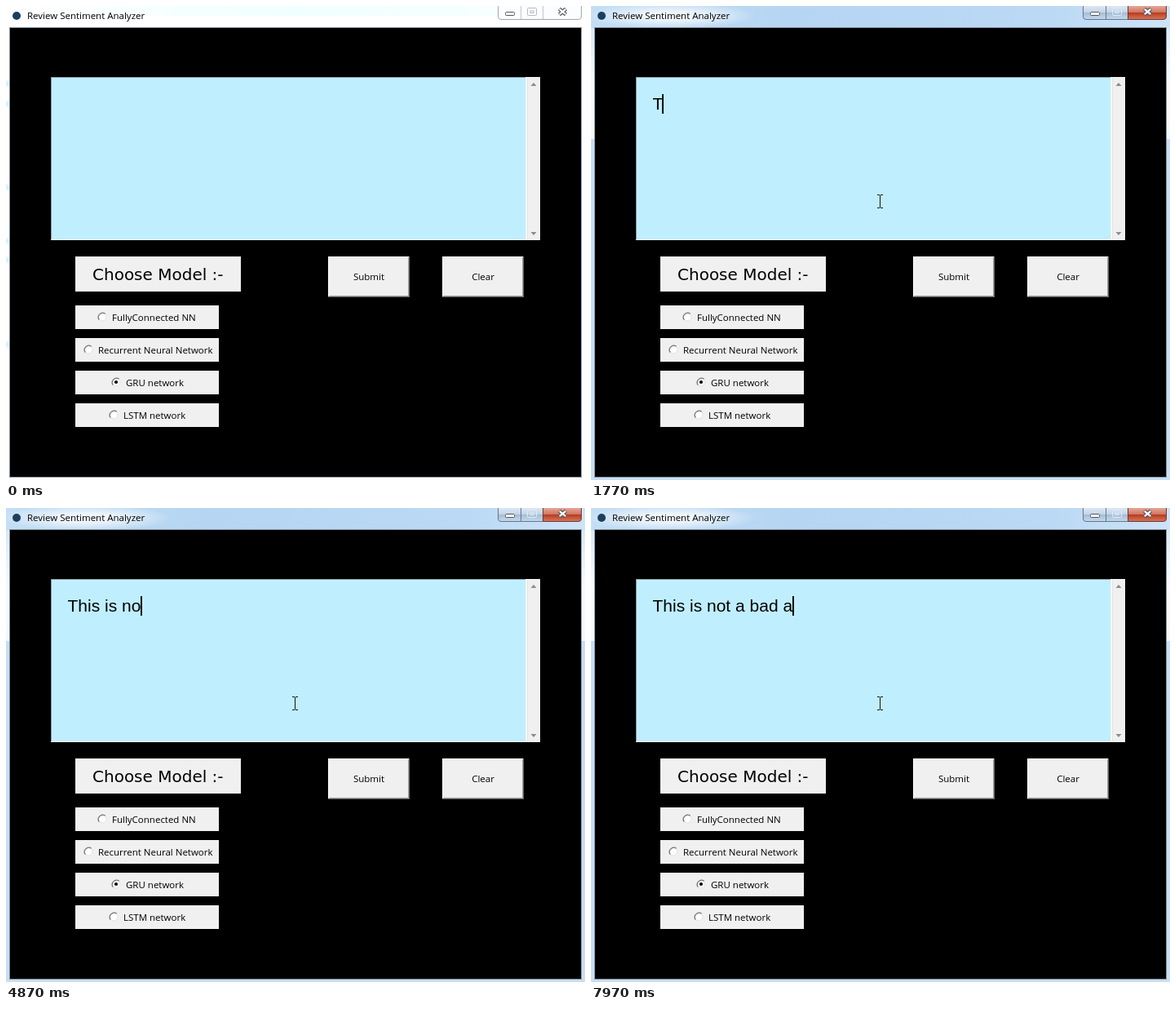
Recreate the animation shown at these times as an HTML page. Size 710x581 px, loop 8000 ms.

```html
<!DOCTYPE html>
<html lang="en">
<head>
<meta charset="utf-8">
<title>Review Sentiment Analyzer</title>
<style>
html, body { margin: 0; width: 710px; height: 581px; overflow: hidden; background: #fff; }
svg { display: block; }
text { font: 11.5px "Open Sans", "Noto Sans", sans-serif; white-space: pre; }
.heading { font: 20px "DejaVu Sans", sans-serif; }
#typed { font: 21px "Liberation Sans", Arial, sans-serif; font-kerning: none; }
.mid { text-anchor: middle; }
.crisp { shape-rendering: crispEdges; }
</style>
</head>
<body>
<svg width="710" height="581" viewBox="0 0 710 581">
  <defs>
    <linearGradient id="idleBar"><stop stop-color="#fff"/><stop offset=".5" stop-color="#f0ffff"/><stop offset="1" stop-color="#fbffff"/></linearGradient>
    <linearGradient id="activeBar"><stop stop-color="#c4def5"/><stop offset=".35" stop-color="#b5d5f2"/><stop offset=".8" stop-color="#bbd9f5"/><stop offset="1" stop-color="#cfe3f7"/></linearGradient>
    <linearGradient id="side" x2="0" y2="1"><stop stop-color="#d8e9f8"/><stop offset=".5" stop-color="#f6faff"/><stop offset="1" stop-color="#f4f8fd"/></linearGradient>
    <linearGradient id="blueKey" x2="0" y2="1"><stop stop-color="#dbe7f4"/><stop offset=".48" stop-color="#c3d4e7"/><stop offset=".5" stop-color="#a5bcd4"/><stop offset="1" stop-color="#c3dbef"/></linearGradient>
    <linearGradient id="redKey" x2="0" y2="1"><stop stop-color="#e5a798"/><stop offset=".48" stop-color="#cf7560"/><stop offset=".5" stop-color="#b93a20"/><stop offset="1" stop-color="#d5795a"/></linearGradient>
    <radialGradient id="glow"><stop offset=".3" stop-color="#fff" stop-opacity=".75"/><stop offset="1" stop-color="#fff" stop-opacity="0"/></radialGradient>
    <filter id="soft"><feGaussianBlur stdDeviation="1.5"/></filter>
  </defs>

  <g id="idle">
    <rect width="710" height="581" fill="#fff"/>
    <rect width="710" height="12" fill="url(#idleBar)"/>
    <g id="spots" fill="#b4ecff" filter="url(#soft)"></g>
    <path d="M603.5 0V13Q603.5 16.5 607 16.5H702Q705.5 16.5 705.5 13V0" fill="#fbfdfe" stroke="#a3a8ad"/>
    <path d="M631.5 0V16M658.5 0V16" stroke="#c3c8cc"/>
  </g>
  <g id="active">
    <rect width="710" height="581" fill="#c9def3"/>
    <rect width="710" height="27" fill="url(#activeBar)"/>
    <ellipse cx="98" cy="12" rx="105" ry="16" fill="url(#glow)"/>
    <path d="M0 27H4V163H0ZM706 27H710V163H706Z" fill="url(#side)"/>
    <path d="M603.5 0V13Q603.5 16.5 607 16.5H658.5V0" fill="url(#blueKey)" stroke="#65788c"/>
    <path d="M658.5 0V16.5H702Q705.5 16.5 705.5 13V0" fill="url(#redKey)" stroke="#6a3a38"/>
    <path d="M631.5 0V16" stroke="#65788c"/>
  </g>

  <rect x="612.5" y="7.5" width="11" height="4" rx="1" fill="#fff" stroke="#53565f"/>
  <g id="maxIcon" fill="none" stroke="#b5bac0"><rect x="639.5" y="2.5" width="11" height="9" rx="1"/><rect x="643" y="6" width="4" height="2.5"/></g>
  <path d="M678.5 3.5L686.5 10.5M686.5 3.5L678.5 10.5" stroke="#53565f" stroke-width="4.6"/>
  <path d="M678.8 3.8L686.2 10.2M686.2 3.8L678.8 10.2" stroke="#fff" stroke-width="2.2"/>
  <circle cx="13" cy="12" r="5" fill="#1d3f5e"/>
  <text x="26" y="16">Review Sentiment Analyzer</text>

  <rect x="4.5" y="26.5" width="701" height="551" stroke="#7d8a94"/>
  <g class="crisp">
    <path d="M55 87H655V287H55Z" fill="#f0f0f0"/>
    <path d="M55 87H637V286H55Z" fill="#bfefff"/>
    <path d="M55 286.5H655M638 87V287" stroke="#fff" fill="none"/>
    <path d="M55.5 286V87.5H637" stroke="#8b9ba3" fill="none"/>
    <path d="M639.5 88V286" stroke="#e2e2e2"/>
  </g>
  <path d="M643.5 98L647 94L650.5 98ZM643.5 277L647 281L650.5 277Z" fill="#8c8c8c"/>
  <rect x="85" y="307" width="203" height="43" fill="#f0f0f0"/>
  <text class="heading" x="106" y="336">Choose Model :-</text>
  <g id="controls"></g>

  <text id="typed" x="75.5" y="127"></text>
  <rect id="caret" class="crisp" y="108" height="24"/>
  <circle id="click" cx="352" cy="238" r="12" fill="#dff17c"/>
  <g id="pointer">
    <path id="beam" class="crisp" d="M-3 -7.5H0M1 -7.5H4M-3 8.5H0M1 8.5H4M.5 -7V8" fill="none"/>
    <path id="arrow" d="M.5 .5V16.5L4.5 13L7 19L9.5 18L7 12H12Z" fill="#fff" stroke="#000"/>
  </g>
</svg>
<script>
const $ = id => document.getElementById(id);

$('spots').innerHTML = [95, 120, 222, 288, 311, 415]
  .map(y => `<rect y="${y - 3}" width="3" height="6"/>`).join('');

const button = (x, label) => `<g class="crisp" fill="none">
  <rect x="${x}" y="307" width="100" height="50" fill="#f0f0f0"/>
  <path d="M${x + .5} 356V307.5H${x + 99}" stroke="#fff"/>
  <path d="M${x + 1} 355.5H${x + 98.5}V308" stroke="#a0a0a0"/>
  <path d="M${x} 356.5H${x + 99.5}V307" stroke="#696969"/></g>
  <text class="mid" x="${x + 50}" y="336">${label}</text>`;

const radio = (y, x, label, chosen) => `<rect x="85" y="${y}" width="176" height="29" fill="#f0f0f0"/>
  <g transform="translate(${x} ${y + 14})"><circle r="5" fill="#fff" stroke="#e3e3e3"/>
  <path d="M-3.7 3.7A5.3 5.3 0 0 1 3.7 -3.7" fill="none" stroke="#777" stroke-width="1.3"/>
  ${chosen ? '<circle r="2.1"/>' : ''}</g>
  <text x="${x + 12}" y="${y + 19}">${label}</text>`;

$('controls').innerHTML = button(395, 'Submit') + button(535, 'Clear') +
  radio(367, 118, 'FullyConnected NN') + radio(407, 101, 'Recurrent Neural Network') +
  radio(447, 135, 'GRU network', true) + radio(487, 132, 'LSTM network');

const DURATION = 8000, ENTER = 310, CLICK = 690, RELEASE = 770;
const MESSAGE = 'This is not a bad a';
const keyTimes = [1770, 2150, 2380, 2700, 3390, 3700, 3850, 4320, 4420, 4870,
  5100, 5410, 5870, 6190, 6570, 6880, 7270, 7440, 7820];
// The caret toggles at each of these times, starting hidden.
const blinkTimes = [690, 1300, 1620, 2230, 2540, 3080, 3390, 4000, 4320, 4940,
  5250, 5870, 6190, 6800, 7110, 7670, 7970];

const passed = (times, t) => times.filter(time => t >= time).length;
const show = (id, visible) => $(id).style.display = visible ? '' : 'none';

function drawPointer(t) {
  const progress = Math.min(1, (Math.floor((t - ENTER) / 75) + 1) / 5);
  const left = (1 - progress) ** 2;
  const x = Math.round(354 + 90 * left), y = Math.round(239 + 400 * left);
  const overText = y < 287, pressed = t >= CLICK && t < RELEASE;
  show('pointer', t >= ENTER);
  show('beam', overText);
  show('arrow', !overText);
  show('click', pressed);
  $('beam').setAttribute('stroke', pressed ? '#a0521c' : '#111');
  $('pointer').setAttribute('transform', `translate(${x} ${y})`);
}

function drawTyping(t) {
  const count = passed(keyTimes, t), typed = $('typed'), caret = $('caret');
  typed.textContent = MESSAGE.slice(0, count);
  const end = Math.floor(75.5 + typed.getComputedTextLength()) - (count < 6);
  caret.setAttribute('x', Math.max(76, end));
  caret.setAttribute('width', count ? 2 : 1);
  show('caret', passed(blinkTimes, t) % 2);
}

function frame() {
  const t = performance.now() % DURATION, focused = t >= CLICK;
  show('idle', !focused);
  show('active', focused);
  $('maxIcon').setAttribute('stroke', focused ? '#dfeaf5' : '#b5bac0');
  drawPointer(t);
  drawTyping(t);
  requestAnimationFrame(frame);
}
frame();
</script>
</body>
</html>
```
